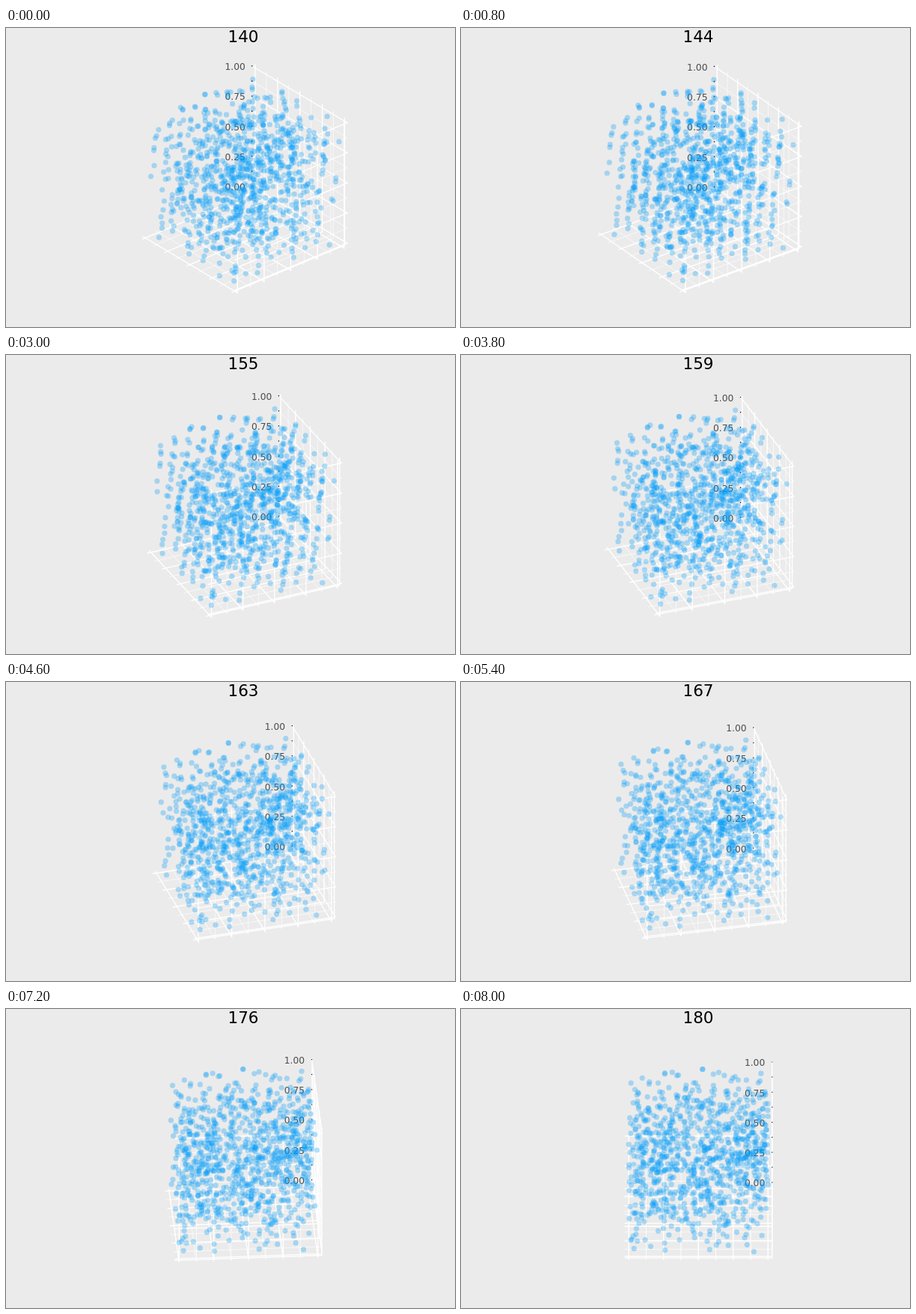
An HTML page with a canvas that plays this animation: 600x400 px, repeating every 8200 ms.

```html
<!DOCTYPE html>
<html lang="en">
<head>
<meta charset="utf-8">
<title>Rotating scatter plot</title>
<style>
  html, body { margin: 0; width: 100%; height: 100%; overflow: hidden; background: #ebebeb; }
  svg, canvas { position: absolute; left: 0; top: 0; width: 600px; height: 400px; }
  text { font-family: "DejaVu Sans", sans-serif; }
  path { fill: none; stroke: #fff; }
  #major { stroke-width: 1.35; }
  #minor { stroke-width: 0.65; }
  #ticks { stroke: #000; stroke-width: 1.3; }
  #labels { font-size: 12.3px; fill: #4d4d4d; text-anchor: end; }
  #title { font-size: 21.5px; text-anchor: middle; }
</style>
</head>
<body>
<svg viewBox="0 0 600 400">
  <path id="minor"/>
  <path id="major"/>
  <path id="ticks"/>
  <g id="labels">
    <text>0.00</text><text>0.25</text><text>0.50</text><text>0.75</text><text>1.00</text>
  </g>
  <text id="title" x="317" y="18.9">140</text>
</svg>
<canvas width="600" height="400"></canvas>
<script>
const CX = 317.2, CY = 201.2, SCALE = 186;
const LO = -0.03, HI = 1.03;
const TILT = Math.PI / 6;
const FIRST = 140, STEPS = 41, STEP_MS = 200;
const COUNT = 1000;

const byId = id => document.getElementById(id);
const ctx = document.querySelector('canvas').getContext('2d');
const labels = [...document.querySelectorAll('#labels text')];

// Multiplicative congruential generator whose triples fall on a few planes
let state = 1;
const next = () => (state = state * 65539 % 2 ** 31) / 2 ** 31;
const points = Array.from({ length: COUNT }, () => [next(), next(), next()]);

// Orthographic projection around the centre of the unit cube
function projector(degrees) {
  const a = degrees * Math.PI / 180;
  const c = Math.cos(a), s = Math.sin(a);
  return ([x, y, z]) => {
    x -= 0.5; y -= 0.5; z -= 0.5;
    return [
      CX + SCALE * (c * x + s * y),
      CY + SCALE * (Math.sin(TILT) * (s * x - c * y) - Math.cos(TILT) * z)
    ];
  };
}

// Each grid line runs across one face, then bends onto the next
const gridLines = t => [
  [[t, LO, LO], [t, HI, LO], [t, HI, HI]],
  [[HI, t, LO], [LO, t, LO], [LO, t, HI]],
  [[LO, LO, t], [LO, HI, t], [HI, HI, t]]
];

function draw(degrees) {
  const project = projector(degrees);
  const trace = line => 'M' + line.map(p => project(p).map(v => v.toFixed(2)).join(' ')).join('L');
  let major = '', minor = '', ticks = '';

  for (let i = 0; i <= 8; i++) {
    const t = i / 8;
    const grid = gridLines(t).map(trace).join('');
    if (i % 2) minor += grid;
    else {
      major += grid;
      const [x, y] = project([LO, LO, t]);
      labels[i / 2].setAttribute('x', x - 9.5);
      labels[i / 2].setAttribute('y', y + 4.9);
    }
    ticks += trace([[LO, LO, t], [LO, LO - 0.0106, t]]);
  }
  byId('major').setAttribute('d', major);
  byId('minor').setAttribute('d', minor);
  byId('ticks').setAttribute('d', ticks);
  byId('title').textContent = degrees;

  ctx.clearRect(0, 0, 600, 400);
  ctx.fillStyle = 'rgba(0, 154, 250, 0.3)';
  for (const p of points) {
    const [x, y] = project(p);
    ctx.beginPath();
    ctx.arc(x, y, 3.6, 0, 2 * Math.PI);
    ctx.fill();
  }
}

const start = performance.now();
let shown = -1;
function tick() {
  const step = Math.floor((performance.now() - start) / STEP_MS) % STEPS;
  if (step !== shown) draw(FIRST + (shown = step));
  requestAnimationFrame(tick);
}
tick();
</script>
</body>
</html>
```
